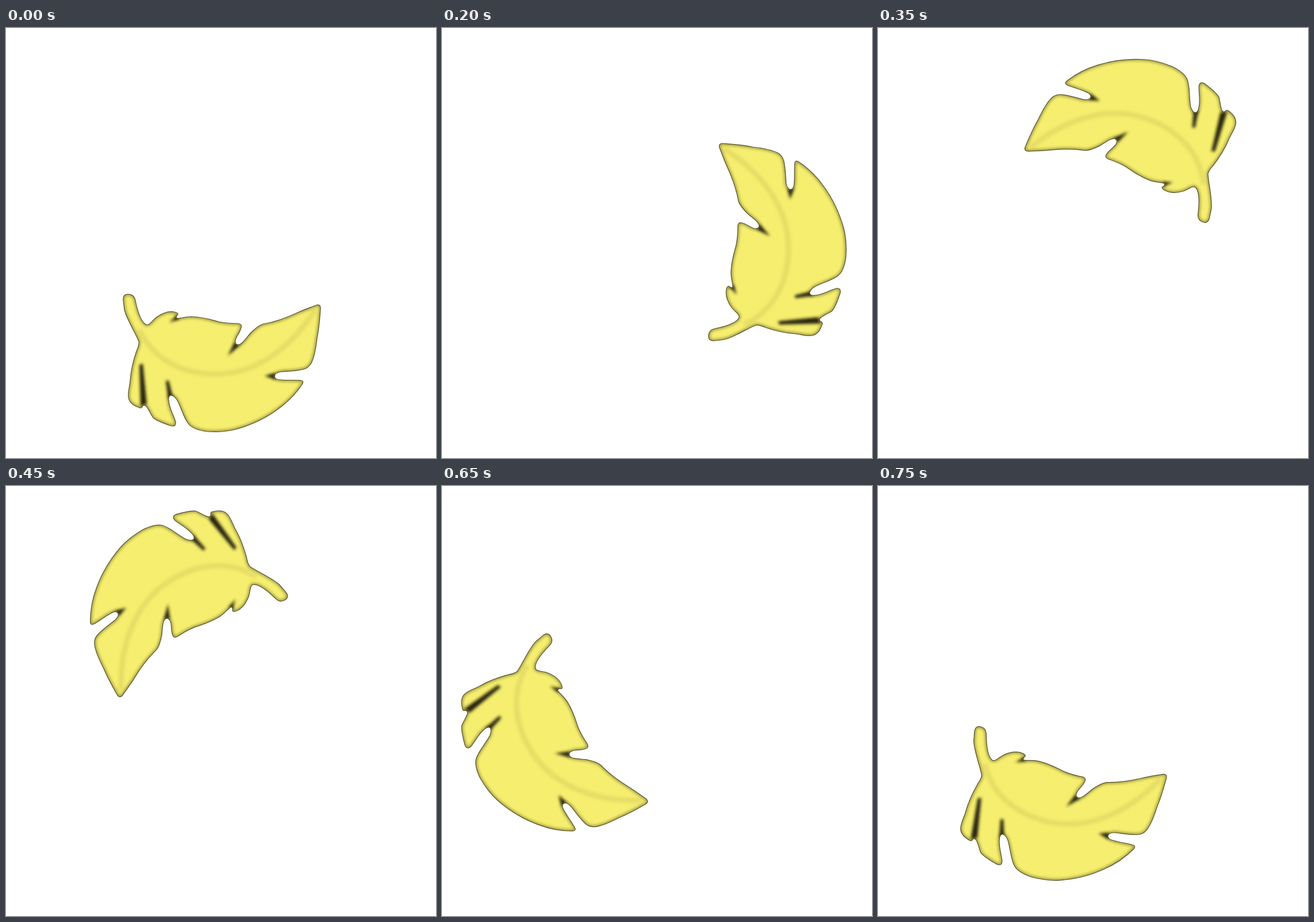
These frames come from a looping animation (748 by 748 pixels, 800 ms). An HTML page:

```html
<!DOCTYPE html>
<html>
<head>
<meta charset="utf-8">
<style>
  html, body { margin: 0; width: 100%; height: 100%; overflow: hidden; background: #fff; }
  svg { display: block; width: 100vw; height: 100vh; }
</style>
</head>
<body>
<svg viewBox="0 0 748 748">
  <defs>
    <path id="outline" d="M204 474Q203 463 212 463Q223 463 225 474C229 493 235 512 244 516
      C250 518 254 509 262 503C272 496 283 492 293 494Q299 495 299 498Q295 502 297 505
      C303 506 310 502 323 502C345 503 355 507 370 511C385 514 395 514 404 514Q411 515 409 521
      C407 530 401 535 399 543Q398 551 404 551C410 551 416 542 425 531C433 523 440 517 447 515
      C470 511 490 503 505 496C518 490 530 486 540 482Q548 480 547 489C546 503 545 520 541 540
      C539 558 536 573 531 583Q526 592 516 594C503 597 490 597 478 598Q467 600 467 606
      Q468 612 478 612C490 613 503 612 513 613Q519 614 515 620C505 635 490 651 473 663
      C450 680 425 691 400 698C385 702 365 703 350 702C335 700 323 696 317 688
      C308 676 305 660 297 646Q291 638 286 639Q282 641 283 648C284 662 292 674 295 685
      Q296 694 287 692C275 688 262 683 256 678C251 671 249 664 244 658Q241 655 238 657
      Q236 663 231 660C222 657 214 651 213 642C212 633 215 624 216 614C217 597 222 577 227 562
      Q232 551 231 545C225 530 210 507 206 490Z"/>
    <clipPath id="inside"><use href="#outline"/></clipPath>
    <filter id="soft" filterUnits="userSpaceOnUse" x="150" y="400" width="450" height="350">
      <feGaussianBlur stdDeviation="2.6"/>
    </filter>
  </defs>
  <g id="feather">
    <use href="#outline" fill="#f5ee6e"/>
    <g clip-path="url(#inside)">
      <path d="M232 525C255 575 305 602 365 602C440 602 500 550 538 490" filter="url(#soft)"
        fill="none" stroke="#e6dd66" stroke-width="9"/>
      <use href="#outline" filter="url(#soft)" fill="none" stroke="#8d883c" stroke-width="4.5"/>
      <path filter="url(#soft)" fill="#25230f" d="M232 586L238 584L245 654L234 658Z
        M278 614L283 613L290 641L282 645Z M386 570L397 547L407 552Z
        M450 605L468 600L469 612Z M284 512L297 500L301 507Z"/>
    </g>
    <use href="#outline" fill="none" stroke="#55512a" stroke-width="1.2"/>
  </g>
</svg>
<script>
  const LOOP = 800, STEP = 50;
  // [time, angle, x drift, y drift]
  const poses = [
    [0, 0, 0, 0],
    [300, -135, 1, 0],
    [450, -213.75, 26.6, -12.2],
    [550, -258.75, 8.8, -30.6],
    [650, -303.75, -21.4, -27.8],
    [750, -348.75, -20, -11],
    [800, -360, 0, 0]
  ];
  const feather = document.getElementById("feather");

  function poseAt(time) {
    const next = poses.findIndex(p => p[0] > time);
    const a = poses[next - 1], b = poses[next];
    const k = (time - a[0]) / (b[0] - a[0]);
    return a.map((v, i) => v + (b[i] - v) * k);
  }

  function draw() {
    const time = Math.floor(performance.now() % LOOP / STEP) * STEP;
    const [, angle, x, y] = poseAt(time);
    feather.setAttribute("transform", `translate(${x} ${y}) rotate(${angle} 374 374)`);
    requestAnimationFrame(draw);
  }
  draw();
</script>
</body>
</html>
```
